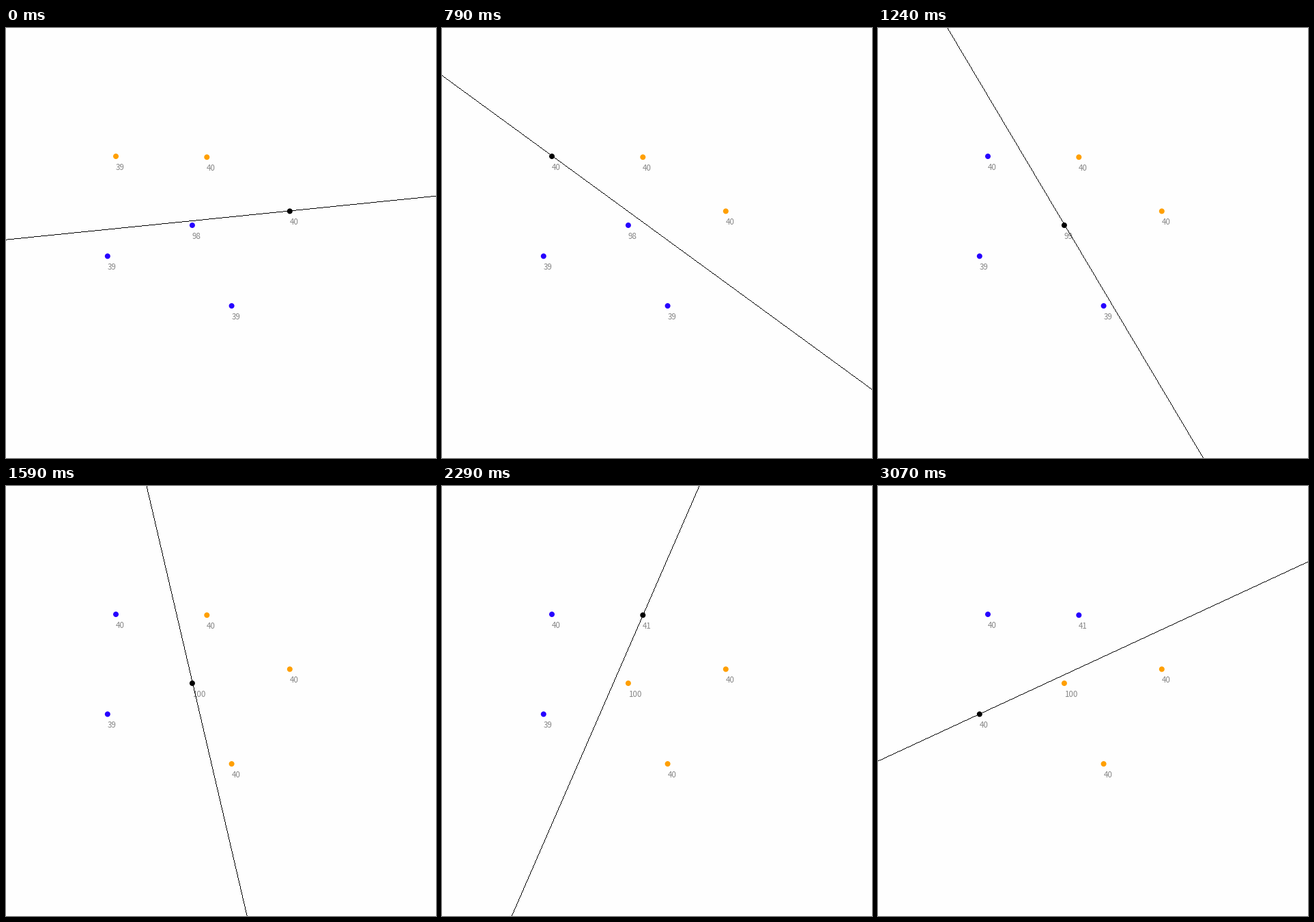
A matplotlib script that plays this animation: 630x630 px, repeating every 3170 ms.

```python
import numpy as np
import matplotlib.pyplot as plt
from matplotlib.animation import FuncAnimation
from matplotlib.patches import Circle

SIZE = 630
INTERVAL, FRAMES = 10, 317
STEPS, STEP_FRAMES = 36, 8.8  # the picture advances every 88 ms

PAPER, BLUE, ORANGE, GREY = "#fefefe", "#2600ff", "#ff9f00", "#888888"

START = 5.8                  # degrees
TURN = np.degrees(1 / 40)    # clockwise turn per tick
TICKS_PER_STEP = 3.31
ROUTE = "ABCDCEF"            # pivots in the order the line meets them

# x, y, hits so far
POINTS = {
    "A": (415.8, 268.4, 40),
    "B": (161.0, 188.0, 39),
    "C": (272.9, 289.0, 98),
    "D": (330.6, 407.1, 39),
    "E": (294.3, 189.2, 40),
    "F": (148.8, 334.3, 39),
}


def bearing(p, q):
    """Angle of the line through two points, within (-180, 0]."""
    (px, py, _), (qx, qy, _) = POINTS[p], POINTS[q]
    return -np.degrees(np.arctan2(qy - py, qx - px)) % -180


def windmill(ticks):
    """Turn the line about its pivot; it snaps onto each point it meets."""
    angle, leg = START, 0
    for _ in range(ticks):
        angle -= TURN
        while leg + 1 < len(ROUTE):
            hit = bearing(ROUTE[leg], ROUTE[leg + 1])
            if angle > hit + 1e-9:
                break
            angle, leg = hit, leg + 1
    return angle, leg


fig = plt.figure(figsize=(SIZE / 72, SIZE / 72), dpi=72, facecolor=PAPER)
ax = fig.add_axes([0, 0, 1, 1])
ax.set_xlim(0, SIZE)
ax.set_ylim(SIZE, 0)
ax.axis("off")

dots, labels = {}, {}
for name, (x, y, hits) in POINTS.items():
    dots[name] = ax.add_patch(Circle((x, y), 4, lw=0, zorder=4))
    labels[name] = ax.text(x, y + 20, str(hits), color=GREY, fontsize=11.6,
                           family="Noto Sans CJK JP", va="baseline", zorder=2)
# Pixel markers give a crisp line, one pixel per row or column
beam, = ax.plot([], [], "k,", antialiased=False, zorder=3)


def draw(i):
    step = min(int((i + 1.2) / STEP_FRAMES), STEPS - 1)
    angle, leg = windmill(int(step * TICKS_PER_STEP + 0.85))
    dx, dy = np.cos(np.radians(angle)), -np.sin(np.radians(angle))

    pivot = ROUTE[leg]
    px, py, _ = POINTS[pivot]
    reach = np.arange(-SIZE, SIZE) / max(abs(dx), abs(dy))
    beam.set_data(px + reach * dx, py + reach * dy)

    for name, (x, y, hits) in POINTS.items():
        left = dx * (y - py) - dy * (x - px) < 1e-6
        color = "black" if name == pivot else ORANGE if left else BLUE
        dots[name].set_facecolor(color)
        labels[name].set_text(str(hits + ROUTE[1:leg + 1].count(name)))
    return [beam, *dots.values(), *labels.values()]


anim = FuncAnimation(fig, draw, frames=FRAMES, interval=INTERVAL,
                     init_func=lambda: draw(0), repeat=True, repeat_delay=0)
plt.show()
```
